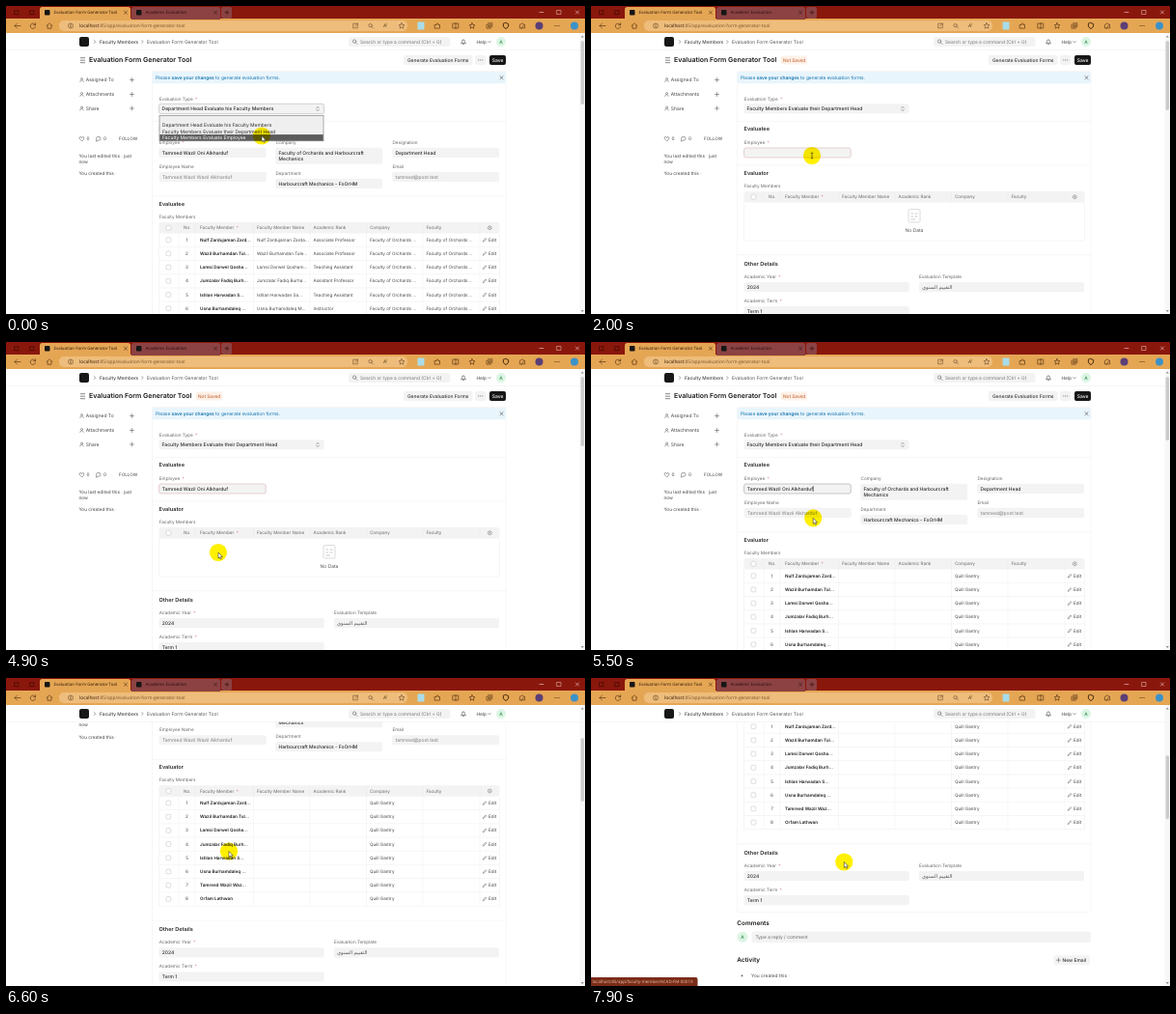
Write an HTML page that moves like this. It is 600 px wide and 319 px high and loops after 8 s.

```html
<!DOCTYPE html>
<html lang="en">
<head>
<meta charset="utf-8">
<title>Evaluation Form Generator Tool</title>
<style>
  html, body { margin: 0; width: 100%; height: 100%; overflow: hidden; background: #fff; }
  svg { display: block; width: 100%; height: 100%; }
  text { font-family: Inter, sans-serif; text-rendering: geometricPrecision; white-space: pre; }
  .chrome text { font-family: "Open Sans", sans-serif; }
  text.arabic { font-family: "DejaVu Sans", sans-serif; }
  .req { fill: #d98080; }
  .b { font-weight: 600; }
  #glow { mix-blend-mode: multiply; }
</style>
</head>
<body>
<svg id="stage" viewBox="0 0 600 319"></svg>
<script>
const DURATION = 8000, STEP = 100;
const INK = '#2b2b2b', GREY = '#666', SOFT = '#f3f3f3', LINE = '#ececec';

// Markup helpers; text is placed by its vertical centre.
const text = (x, y, str, size = 4.65, fill = GREY, weight = 400, attrs = '') =>
  `<text x="${x}" y="${y + size * .34}" font-size="${size}" fill="${fill}" font-weight="${weight}" ${attrs}>${str}</text>`;
const rect = (x, y, w, h, fill, r = 0, attrs = '') =>
  `<rect x="${x}" y="${y}" width="${w}" height="${h}" fill="${fill}" rx="${r}" ${attrs}/>`;
const circle = (x, y, r, fill, attrs = '') => `<circle cx="${x}" cy="${y}" r="${r}" fill="${fill}" ${attrs}/>`;
const path = (d, stroke = GREY, width = .6, fill = 'none', attrs = '') =>
  `<path d="${d}" stroke="${stroke}" stroke-width="${width}" fill="${fill}" ${attrs}/>`;
const icon = (x, y, d, stroke, width, fill) =>
  path(d, stroke, width, fill, `transform="translate(${x} ${y})" stroke-linecap="round" stroke-linejoin="round"`);
const group = (id, ...parts) => `<g id="${id}">${parts.join('')}</g>`;
const middle = 'text-anchor="middle"';
const req = '<tspan class="req" dx="1">*</tspan>';

const ICON = {
  plus: 'M-2 0H2M0-2V2',
  cross: 'M-1.6-1.6L1.6 1.6M1.6-1.6L-1.6 1.6',
  lens: 'M1 1L2.4 2.4M1.3-.4A1.7 1.7 0 1 1-2.1-.4A1.7 1.7 0 1 1 1.3-.4',
  right: 'M-.8-1.6L.8 0L-.8 1.6',
  down: 'M-1.2-.6L0 .6L1.2-.6',
  star: 'M0-3L.9-1 3-.8 1.4.6 1.9 2.7 0 1.6-1.9 2.7-1.4.6-3-.8-.9-1Z',
  dots: 'M-2 0H-1.9M0 0H.1M2 0H2.1',
  box: 'M-2-2H2V2H-2Z',
  pencil: 'M-1.6 1.6L-1.2.4 1-1.8 1.8-1-.4 1.2Z'
};

const PERSON = 'Tamreed Wazil Oni Alkharduf';
const ORG = 'Quill Gantry', FACULTY = 'Faculty of Orchards ...';
const MEMBERS = [
  ['Nulf Zardujaman Zard...', 'Nulf Zardujaman Zarda...', 'Associate Professor'],
  ['Wazil Burhamdan Tul...', 'Wazil Burhamdan Tule...', 'Associate Professor'],
  ['Lamsi Darwel Qosha...', 'Lamsi Darwel Qosham...', 'Teaching Assistant'],
  ['Jumzalar Fadiq Burh...', 'Jumzalar Fadiq Burha...', 'Assistant Professor'],
  ['Ishlan Harwadan S...', 'Ishlan Harwadan Sa...', 'Teaching Assistant'],
  ['Usna Burhamdaleq ...', 'Usna Burhamdaleq M...', 'Instructor'],
  ['Tamreed Wazil Waz...', 'Tamreed Wazil Wazi...', 'Instructor'],
  ['Orfam Lathwan', 'Orfam Lathwan', 'Instructor']
];
const OPTIONS = ['Department Head Evaluate his Faculty Members',
  'Faculty Members Evaluate their Department Head', 'Faculty Members Evaluate Employee'];

const field = (x, y, w, label, lines, fill = INK, weight = 500) =>
  text(x, y, label) + rect(x - .3, y + 5.8, w, 3.2 + 6.9 * [].concat(lines).length, SOFT, 2) +
  [].concat(lines).map((s, i) => text(x + 3, y + 10.9 + i * 6.9, s, 4.95, fill, weight)).join('');

const browser = () => {
  const bar = '#e5a654', dark = '#4a2a10', pale = '#f0d4cc';
  const at = (x, d, w = .6) => icon(x, 20.5, d, dark, w);
  const tab = (x, w, fill, ink, title) =>
    path(`M${x} 14V3.5q0-2.5 2.5-2.5h${w - 5}q2.5 0 2.5 2.5V14Z`, 'none', 0, fill) +
    rect(x + 5, 4, 5.5, 5.5, '#161616', 1) + text(x + 14.5, 6.8, title, 4.45, ink) +
    icon(x + w - 5, 6.7, ICON.cross, ink, .5);
  return `<g class="chrome">` + rect(0, 0, 600, 14, '#8a170c') + rect(0, 13, 600, 15, bar) +
    tab(35, 94, bar, '#2a1608', 'Evaluation Form Generator Tool') +
    tab(130, 92, '#8c4243', '#260c0c', 'Academic Evaluation') +
    icon(11, 6.7, ICON.box, '#3d0905', .7) + icon(27, 6.7, ICON.box, '#3d0905', .7) +
    rect(223, 1, 11, 12, '#8c4243', 2) + icon(229, 6.7, ICON.plus, '#260c0c', .6) +
    icon(555, 6.5, 'M-2 0H2', pale, .6) + icon(573, 6.5, ICON.box, pale, .5) + icon(592, 6.5, ICON.cross, pale, .6) +
    rect(55, 15, 361, 11, '#eebd7c', 5) +
    at(12, 'M3 0H-3M-.6-2.4L-3 0-.6 2.4') + at(28, 'M2.4-1A2.7 2.7 0 1 0 2.6 1M2.6-2.8V-.8H.6') +
    at(45, 'M-2.8 0L0-2.8 2.8 0M-2-.6V2.7H2V-.6') + circle(67, 20.5, 2.5, 'none', `stroke="${dark}" stroke-width=".5"`) +
    at(67, 'M0-.2V1.3M0-1.3V-1.2') +
    text(76, 20.5, 'localhost<tspan fill="#7a532c">:85/app/evaluation-form-generator-tool</tspan>', 4.85, '#2a1608') +
    at(362, 'M0-2.3H-2.3V2.3H2.3V0M.6-2.4H2.4V-.6M2.4-2.4L-.3.3', .45) + at(378, ICON.lens, .45) +
    text(391, 20.5, 'A⁾', 5, dark) + at(410, ICON.star, .45) + rect(426.5, 16.5, 7, 8, '#a9dcea', 1) +
    at(447, 'M-2.5-1H-.8A1 1 0 1 1 1-1H2.5V2.6H-2.5Z') + at(466, 'M-2.8-2.4H2.8V2.4H-2.8ZM0-3V3') +
    at(483, ICON.star) + at(501, 'M-2.6-1.4H1.4V2.6H-2.6ZM-1.2-2.8H2.8V1.2M-.6-.4V1.6M-1.6.6H.4') +
    at(518, 'M0-3L2.6-2V.4Q2 2.3 0 3Q-2 2.3-2.6.4V-2Z', 1) + at(535, 'M-2.6 2V-1L0-2.6 2.6-1V2ZM-1 2.6L2-1') +
    circle(552.5, 20.5, 4, '#5b3f78') + at(571, ICON.dots, 1) + circle(589, 20.5, 4, '#3b93c8') + '</g>';
};

const navbar = () => rect(0, 28, 600, 17.5, '#fff') + path('M0 45.6H595', LINE, .5) +
  rect(76, 32, 10, 10, '#171717', 2) + icon(92, 37, ICON.right, GREY, .55) +
  text(97, 37, 'Faculty Members', 4.85, '#444', 500) + icon(141.5, 37, ICON.right, GREY, .55) +
  text(146, 37, 'Evaluation Form Generator Tool', 4.97, '#555') +
  rect(355, 32, 105.5, 10, SOFT, 2) + icon(361.5, 37, ICON.lens, '#444', .5) +
  text(367, 37, 'Search or type a command (Ctrl + G)', 4.85, '#777') +
  icon(474, 37, 'M-2.2 1.4Q-1.4.6-1.4-.6A1.4 1.5 0 0 1 1.4-.6Q1.4.6 2.2 1.4ZM-.5 2.4H.5', '#333', .55) +
  path('M481 33V41', LINE, .5) + text(487.5, 37, 'Help', 4.85, '#444') + icon(501, 37.2, ICON.down, '#444', .55) +
  circle(513, 37, 5, '#dcf5e3') + text(513, 37, 'A', 4.8, '#28844b', 500, middle);

const pageHead = () => path('M77 53.7H82M77 56.2H82M77 58.7H82', '#444', .65) +
  text(86, 56, 'Evaluation Form Generator Tool', 7, '#171717', 600) +
  group('badge', rect(196.5, 51.4, 27.5, 9, '#fdf1e7', 2.5), text(199, 56, 'Not Saved', 4.75, '#bd5323')) +
  rect(412, 51, 71.5, 10, SOFT, 2) + text(447.7, 56, 'Generate Evaluation Forms', 4.95, '#333', 500, middle) +
  rect(486, 51, 11.5, 10, SOFT, 2) + icon(491.7, 56, ICON.dots, '#444', .8) +
  rect(501, 51, 17, 10, '#171717', 2) + text(509.5, 56, 'Save', 4.95, '#fff', 500, middle);

const sidebar = () => [['Assigned To', 76.5], ['Attachments', 91.5], ['Share', 106]].map(([s, y]) =>
    icon(78.5, y, 'M-1.8 2Q-1.8.3 0 .3T1.8 2M1-1A1 1 0 1 1-1-1A1 1 0 1 1 1-1', '#555', .5) +
    text(82.8, y, s, 4.95, '#444') + icon(130.5, y, ICON.plus, '#444', .5)).join('') +
  icon(78.5, 137.5, 'M0 2.2L-2.3 0Q-3-1.7-1.4-2Q-.4-2.1 0-1Q.4-2.1 1.4-2Q3-1.7 2.3 0Z', '#444', .5) +
  text(83.5, 137.7, '0', 4.85, '#444') + path('M91.3 135V140', LINE, .5) +
  icon(95.8, 137.5, 'M-2.2 2.3V-.2A2.2 2 0 1 1 0 1.8Z', '#444', .5) + text(101, 137.7, '0', 4.85, '#444') +
  text(117, 137.7, 'FOLLOW', 4.6, '#444') +
  text(75.5, 155, 'You last edited this · just', 4.75, '#444') + text(75.5, 161.3, 'now', 4.75, '#444') +
  text(75.5, 173.7, 'You created this ·', 4.75, '#444');

const details = () => field(159, 166, 111, 'Employee Name', 'Tamreed Wazil Wazil Alkharduf', '#808080', 400) +
  field(279.5, 141, 111, 'Company', ['Faculty of Orchards and Harbourcraft', 'Mechanics']) +
  field(279.5, 173, 111, 'Department', 'Harbourcraft Mechanics - FoOrHM') +
  field(400.5, 141, 111, 'Designation', 'Department Head') +
  field(400.5, 166, 111, 'Email', 'tamreed@post.test', '#808080', 400);

const COLUMNS = [179, 196, 256.5, 315, 373.5, 432, 491];
const checkbox = y => rect(166, y - 2.4, 4.8, 4.8, '#fff', 1.2, 'stroke="#bbb" stroke-width=".5"');
const row = ([member, name, rank], i, full) => {
  const y = 37.2 + 14.2 * i, cell = (x, s) => text(x, y, s, 4.6, '#444');
  return checkbox(y) + text(187.5, y, i + 1, 4.6, '#444', 400, middle) +
    text(201, y, member, 4.6, '#1f1f1f', 600, full ? '' : `class="member"`) +
    (full ? cell(260, name) + cell(318.5, rank) + cell(377, FACULTY) + cell(435.5, FACULTY) : cell(377, ORG)) +
    icon(496, y, ICON.pencil, '#444', .45) + cell(500, 'Edit') + path(`M158.5 ${y + 7.1}H511.5`, LINE, .5);
};
const rows = (id, full) => group(id, path('M158.5 30.5V144.1M511.5 30.5V144.1' +
  COLUMNS.map(x => `M${x} 30.5V144.1`).join(''), LINE, .5), ...MEMBERS.map((m, i) => row(m, i, full)));

const memberTable = () => path('M151.5-8H518', LINE, .5) +
  text(158.5, -.2, 'Evaluator', 5.6, INK, 600, 'id="tableTitle"') + text(158.5, 13, 'Faculty Members') +
  rect(158.5, 19, 353, 11.5, SOFT, 2) + path(COLUMNS.map(x => `M${x} 19V30.5`).join(''), '#e8e8e8', .5) + checkbox(24.7) +
  [[184, 'No.'], [201, 'Faculty Member ' + req], [260, 'Faculty Member Name'], [318.5, 'Academic Rank'],
    [377, 'Company'], [435.5, 'Faculty']].map(([x, s]) => text(x, 24.7, s, 4.6)).join('') +
  circle(501.3, 24.7, 1.9, 'none', 'stroke="#777" stroke-width=".6"') + circle(501.3, 24.7, .6, '#777') +
  group('empty', path('M158.5 30.5V70H511.5V30.5', LINE, .5),
    rect(329, 37.5, 12, 13.5, '#fff', 1.5, 'stroke="#c4c4c4" stroke-width=".6"'),
    path('M331.5 42H334M335.5 42H338.5M331.5 45H334M335.5 45H338.5M331.5 48H336', '#b5b5b5', .7),
    text(335, 59, 'No Data', 4.95, '#555', 400, middle)) +
  rows('fullRows', true) + rows('shortRows', false);

const otherDetails = () => path('M151.5-9.3H518', LINE, .5) + text(158.5, -.2, 'Other Details', 5.6, INK, 600) +
  field(158.8, 13.2, 171.3, 'Academic Year ' + req, '2024') + field(158.8, 38.3, 171.3, 'Academic Term ' + req, 'Term 1') +
  field(340, 13.2, 171.3, 'Evaluation Template', '') +
  text(343, 24, 'التقييم السنوي', 5.2, '#555', 400, 'class="arabic"') +
  text(151.3, 72.9, 'Comments', 6.4, '#171717', 600) + circle(157, 87.3, 5.5, '#dcf5e3') +
  text(157, 87.3, 'A', 4.8, '#28844b', 500, middle) + rect(166.5, 81.5, 351.5, 11.5, SOFT, 2) +
  text(170.5, 87.2, 'Type a reply / comment', 4.85, '#666') +
  text(151.3, 111.1, 'Activity', 6.4, '#171717', 600) + rect(479.5, 106.3, 37.5, 10, SOFT, 2) +
  icon(484.5, 111.2, ICON.plus, '#444', .5) + text(488.5, 111.2, 'New Email', 4.95, '#333', 500) +
  circle(156.5, 127.4, .8, '#444') + text(166, 127.4, 'You created this ·', 4.85, '#444');

const selectMenu = () => group('selectMenu', rect(159, 113.3, 170, 26.5, '#efefef', 0, 'stroke="#777" stroke-width=".6"'),
  rect(159.3, 0, 169.4, 6.5, '#5c5c5c', 0, 'id="optionBar"'),
  ...OPTIONS.map((s, i) => text(162, 123.5 + 6.4 * i, s, 4.98, INK, 400, 'class="option"')));

const linkMenu = () => group('linkMenu',
  rect(158.6, 158.6, 110.8, 66.2, '#000', 3, 'opacity=".06"'),
  rect(158.5, 158, 110.5, 66, '#fff', 2.5, 'stroke="#dcdcdc" stroke-width=".5"'),
  rect(160, 159.7, 107.3, 17, SOFT, 2), text(162.5, 164.2, PERSON, 4.85, INK, 600),
  text(162.5, 171, 'Tamreed Wazil Wazil Alkharduf', 4.75, '#555'),
  rect(160, 178.6, 107.3, 16.8, '#f7f7f7', 2),
  text(162.5, 184, 'Filters applied for <tspan class="b">Designation = Department</tspan>', 4.75, '#555'),
  text(162.5, 190.6, 'Head', 4.75, '#555', 600),
  icon(165, 203.5, ICON.plus, INK, .7), text(169.5, 203.5, 'Create a new Employee', 4.85, '#444'),
  icon(165, 216.2, ICON.lens, INK, .7), text(169.5, 216.2, 'Advanced Search', 4.85, '#444'));

const page = () => group('page', pageHead(), sidebar(),
  rect(151.5, 67.5, 366.5, 0, 'none', 2, `id="card" stroke="${LINE}" stroke-width=".5"`),
  rect(151.5, 68, 366.5, 12.3, '#e9f5fc', 2),
  text(155, 74.2, 'Please <tspan class="b">save your changes</tspan> to generate evaluation forms.', 4.85, '#1273ae'),
  icon(513.5, 74.2, ICON.cross, '#333', .55),
  text(158.8, 96, 'Evaluation Type ' + req),
  rect(158.6, 101.3, 170.9, 10.3, SOFT, 2, 'id="select" stroke-width=".6"'),
  text(161.5, 106.5, '', 5.04, INK, 500, 'id="choice"'),
  icon(323, 106.5, 'M-1.2-.9L0-2.1 1.2-.9M-1.2.9L0 2.1 1.2.9', '#444', .5),
  path('M151.5 119.5H518', LINE, .5), text(158.5, 127.5, '', 5.6, INK, 600, 'id="formTitle"'),
  field(158.8, 141, 111, 'Employee ' + req, ''),
  rect(158.6, 147, 110.6, 10, SOFT, 2, 'id="input" stroke-width=".6"'),
  text(161.8, 152, PERSON, 4.95, INK, 500, 'id="person"'),
  path('M0 149V155', '#222', .6, 'none', 'id="caret"'),
  group('details', details()), group('table', memberTable()), group('other', otherDetails()),
  selectMenu(), linkMenu());

const stage = document.getElementById('stage');
stage.innerHTML = rect(0, 0, 600, 319, '#fff') + page() + navbar() + browser() +
  rect(594.5, 28, 5.5, 291, '#f7f7f7') + path('M595.8 32.6L597.3 30.6 598.8 32.6ZM595.8 315L597.3 317 598.8 315Z', 'none', 0, '#8a8a8a') +
  rect(595.6, 0, 3.4, 66, '#cbcbcb', 1.7, 'id="thumb"') +
  group('status', rect(-2, 310, 112.5, 11, '#7a2c18', 2),
    `<g class="chrome">${text(1.5, 314.6, 'localhost:85/app/faculty-member/ACAD-FM-00019', 4.45, '#e6c0b0')}</g>`) +
  circle(0, 0, 9.1, '#fff000', 'id="glow"') +
  group('pointer', path('M0 0V6 L1.4 4.8 2.3 6.9 3.3 6.5 2.4 4.4H4.3Z', '#111', .5, '#fff', 'id="arrow"'),
    path('M-1.2-2.8H1.2M0-2.8V2.8M-1.2 2.8H1.2', '#222', .6, 'none', 'id="beam"'),
    path('M-.6 0Q0-.7.6 0V2.4L3 3Q3.4 3.2 3.2 4.2L2.6 6.6H-.8L-2.4 4.2Q-2.2 3.4-.6 4.2Z', '#111', .5, '#fff', 'id="hand"'));

const el = {};
stage.querySelectorAll('[id]').forEach(n => el[n.id] = n);
const options = [...stage.querySelectorAll('.option')];
const hoveredMember = stage.querySelectorAll('.member')[5];

const show = (node, on) => node.style.display = on ? '' : 'none';
const move = (node, x, y) => node.setAttribute('transform', `translate(${x} ${y})`);
const label = (node, s) => { if (node.textContent !== s) node.textContent = s; };

// Eased interpolation through [time, ...values] keys.
function track(keys, t) {
  const i = keys.findIndex(k => k[0] > t);
  if (i < 0) return keys[keys.length - 1].slice(1);
  const [a, b] = [keys[i - 1], keys[i]], p = (t - a[0]) / (b[0] - a[0]), e = p * p * (3 - 2 * p);
  return a.slice(1).map((v, k) => v + (b[k + 1] - v) * e);
}
const CURSOR = [[0, 265, 134.5], [100, 265, 134.5], [400, 264, 130], [1000, 264, 130], [1700, 229, 155], [2800, 229, 155],
  [3700, 222, 188.5], [3900, 222, 188.5], [4400, 223, 166], [4600, 223, 160], [4900, 220, 218], [5000, 220, 218],
  [5600, 231, 179.5], [7200, 231, 179.5], [7900, 262.3, 190.5]];
const SCROLL = [[0, 0], [5500, 0], [6200, 100], [6400, 100], [6900, 136], [7200, 136], [7800, 192]];

function draw(t) {
  const [x, y] = track(CURSOR, t), [scroll] = track(SCROLL, t);
  const picked = t >= 500, first = t < 700, loaded = t >= 5200, wide = first || loaded;
  const chosen = t >= 4500, focused = t >= 1500, hover = t >= 6900 && t < 7300;

  move(el.page, 0, -scroll);
  show(el.badge, t >= 600);
  label(el.choice, OPTIONS[picked ? 1 : 0]);
  label(el.formTitle, first ? 'Evaluator' : 'Evaluatee');
  label(el.tableTitle, first ? 'Evaluatee' : 'Evaluator');
  el.select.setAttribute('stroke', focused ? 'none' : '#b5b5b5');
  show(el.selectMenu, !picked);
  const option = t < 200 ? 2 : 1;
  el.optionBar.setAttribute('y', 120.3 + 6.4 * option);
  options.forEach((o, i) => o.setAttribute('fill', i === option ? '#fff' : INK));

  el.input.setAttribute('stroke', !focused ? 'none' : loaded ? '#a5a5a5' : '#dfb5b5');
  show(el.person, first || chosen);
  show(el.caret, focused && (t < 2000 || t >= 2500) && !(chosen && !loaded));
  move(el.caret, chosen ? 161.9 + el.person.getComputedTextLength() : 161.8, 0);
  show(el.linkMenu, t >= 2500 && !chosen);

  show(el.details, wide);
  show(el.empty, !wide);
  show(el.fullRows, first);
  show(el.shortRows, loaded);
  move(el.table, 0, wide ? 205 : 173);
  move(el.other, 0, wide ? 373 : 267);
  el.card.setAttribute('height', wide ? 367 : 261);
  el.thumb.setAttribute('y', 36 + .23 * scroll);
  el.thumb.setAttribute('height', wide ? 66 : 72);
  hoveredMember.setAttribute('text-decoration', hover ? 'underline' : 'none');
  show(el.status, t >= 6900);

  const beam = t >= 1500 && t < 3000;
  move(el.glow, x, y);
  move(el.pointer, x, y);
  show(el.beam, beam);
  show(el.hand, hover);
  show(el.arrow, !beam && !hover);
}

const start = performance.now();
function tick(now) {
  const t = Math.max(0, now - start) % DURATION;
  draw(Math.floor(t / STEP) * STEP);
  requestAnimationFrame(tick);
}
draw(0);
requestAnimationFrame(tick);
</script>
</body>
</html>
```
